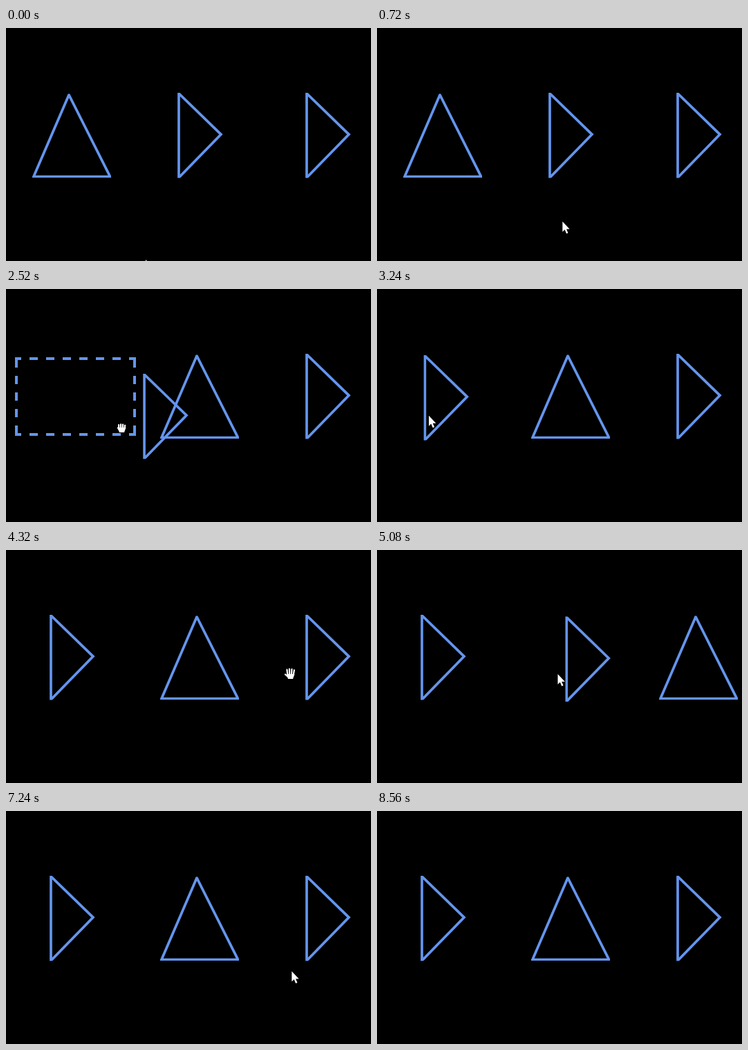
Animation of 528 by 338 pixels, one loop 9.44 s. Source, as an HTML page with a canvas:

```html
<!DOCTYPE html>
<html>
<head>
<meta charset="utf-8">
<style>
html, body { margin: 0; width: 100%; height: 100%; overflow: hidden; background: #000; }
canvas { display: block; }
</style>
</head>
<body>
<canvas id="stage" width="528" height="338"></canvas>
<script>
const ctx = document.getElementById('stage').getContext('2d');
const LOOP = 9440, PITCH = 185, LAG = 74, SETTLE = 430;
const BLUE = '#6495ed';

// Triangle corners and the box that crops their mitres, in the first slot.
const shapes = {
  T: { points: [[40, 215.5], [91, 97], [150.5, 215.5]], crop: [38, 95.5, 114, 122] },
  R: { points: [[65, 95], [126, 154.3], [65, 217]], crop: [63, 94, 67, 123.5] }
};

// Eased pointer moves; the pointer rests in between.
const entry = { x: 200, y: 340 };
const moves = [
  { start: 0, end: 1880, x: 402, y: 172 },
  { start: 2100, end: 2450, x: 167, y: 201 },
  { start: 2520, end: 2960, x: 60, y: 188 },
  { start: 3100, end: 4320, x: 411, y: 180 },
  { start: 4600, end: 4940, x: 262, y: 184 },
  { start: 5000, end: 6100, x: 100, y: 180 },
  { start: 6200, end: 6440, x: 440, y: 184 },
  { start: 6640, end: 7880, x: 380, y: 294 },
  { start: 8120, end: 8520, x: 360, y: 345 }
];

const drags = [
  { grab: 2100, release: 2960, from: 2 },
  { grab: 4600, release: 5000, from: 2 },
  { grab: 6200, release: 6640, from: 0 }
];

const clamp = (v, low, high) => Math.max(low, Math.min(high, v));
const mix = (a, b, p) => a + (b - a) * p;
const smooth = p => p * p * (3 - 2 * p);

function pointer(t) {
  return moves.reduce((pos, move) => {
    const p = smooth(clamp((t - move.start) / (move.end - move.start), 0, 1));
    return { x: mix(pos.x, move.x, p), y: mix(pos.y, move.y, p) };
  }, entry);
}

function drawShape(kind, x, y = 0) {
  const { points, crop } = shapes[kind];
  ctx.save();
  ctx.translate(x, y);
  ctx.beginPath();
  ctx.rect(...crop);
  ctx.clip();
  ctx.beginPath();
  points.forEach(point => ctx.lineTo(...point));
  ctx.closePath();
  ctx.strokeStyle = BLUE;
  ctx.lineWidth = 3.7;
  ctx.stroke();
  ctx.restore();
}

function drawPlaceholder(slot) {
  ctx.save();
  ctx.translate(slot * PITCH, 0);
  ctx.beginPath();
  ctx.rect(13, 99, 175, 114);
  ctx.clip();
  ctx.fillStyle = BLUE;
  for (let x = 10; x < 188; x += 24) {
    ctx.fillRect(x, 99, 12, 4);
    ctx.fillRect(x, 209, 12, 4);
  }
  for (let y = 102; y < 213; y += 24) {
    ctx.fillRect(13, y, 4, 12);
    ctx.fillRect(184, y, 4, 12);
  }
  ctx.restore();
}

const arrow = new Path2D('M2 -4v15l3.3 -3.2 2.4 5.7 2.4 -1 -2.4 -5.5h4.6z');
const palm = new Path2D('M-5 0H6.5L4 7H-3Z');

function drawHand(open) {
  ctx.fill(palm);
  ctx.lineCap = 'round';
  ctx.lineWidth = 2.2;
  ctx.beginPath();
  for (let finger = 0; finger < 4; finger++) {
    const side = finger - 1.3;
    const length = (open ? 7.5 : 4.8) - 0.6 * side * side;
    ctx.moveTo(side * 2.8, 1);
    ctx.lineTo(side * (open ? 3.5 : 3), -length);
  }
  ctx.moveTo(-3, 4);
  ctx.lineTo(open ? -7 : -5, 0.5);
  ctx.stroke();
}

function drawPointer(kind, { x, y }) {
  ctx.save();
  ctx.translate(x, y);
  ctx.fillStyle = ctx.strokeStyle = '#fff';
  if (kind === 'arrow') ctx.fill(arrow);
  else drawHand(kind === 'open');
  ctx.restore();
}

function render(t) {
  ctx.fillStyle = '#000';
  ctx.fillRect(0, 0, 528, 338);
  const cursor = pointer(t);
  const row = [...'TRR'];
  let kind = cursor.y > 213 ? 'arrow' : 'open';
  let carried = null;

  for (const { grab, release, from } of drags.filter(d => t >= d.grab)) {
    // The carried item trails the pointer slightly and slides home once dropped.
    const grip = pointer(grab), hold = pointer(Math.min(t, release) - LAG);
    const slot = clamp(Math.floor((hold.x - 8) / PITCH), 0, 2);
    const settled = clamp((t - release) / SETTLE, 0, 1);
    const rest = (1 - settled) ** 2;
    row.splice(slot, 0, ...row.splice(from, 1));
    carried = {
      slot,
      x: mix(slot * PITCH, from * PITCH + hold.x - grip.x, rest),
      y: (hold.y - grip.y) * rest
    };
    if (t < release) {
      drawPlaceholder(slot);
      kind = 'closed';
    } else if (settled < 1) {
      kind = 'arrow';
    }
  }

  row.forEach((shape, i) => {
    if (carried && carried.slot === i) drawShape(shape, carried.x, carried.y);
    else drawShape(shape, i * PITCH);
  });
  drawPointer(kind, cursor);
}

const start = performance.now();
function tick() {
  render((performance.now() - start) % LOOP);
  requestAnimationFrame(tick);
}
tick();
</script>
</body>
</html>
```
